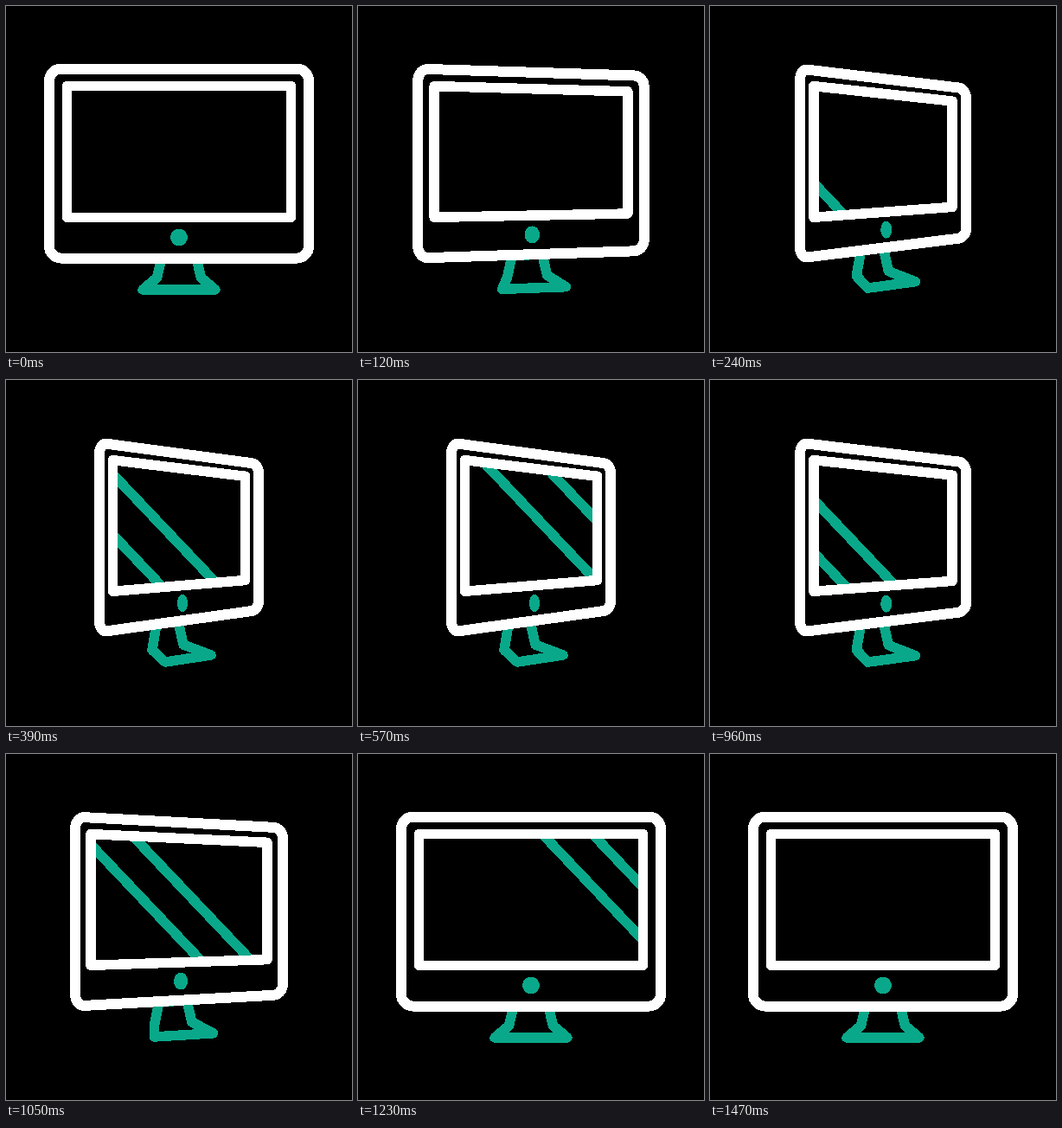
Write an HTML page that moves like this. It is 400 px wide and 400 px high and loops after 3.62 s.

```html
<!DOCTYPE html>
<html lang="en">
<head>
<meta charset="utf-8">
<title>Turning monitor</title>
<style>
  html, body { margin: 0; width: 100%; height: 100%; overflow: hidden; background: #000; }
  svg { display: block; width: 100%; height: 100%; }
  path { fill: none; stroke: #fff; stroke-width: 11.5; stroke-linejoin: round; shape-rendering: crispEdges; }
  #bezel { stroke-width: 12; }
  #stand, #stripes { stroke: #0aa88a; }
  #dot { fill: #0aa88a; shape-rendering: crispEdges; }
</style>
</head>
<body>
<svg viewBox="0 0 400 400">
  <clipPath id="glass"><path id="pane"/></clipPath>
  <path id="stand"/>
  <path id="bezel"/>
  <g clip-path="url(#glass)"><path id="stripes"/></g>
  <path id="screen"/>
  <ellipse id="dot"/>
</svg>
<script>
const LOOP = 3620, STEP = 30, TURN = 294, TURN_END = 1200;
const SWEEP_START = 150, SWEEP = 660;

const $ = id => document.getElementById(id);
const set = (id, attrs) => Object.entries(attrs).forEach(([k, v]) => $(id).setAttribute(k, v));
const mix = (a, b, p) => a + (b - a) * p;
const lerp = (a, b, p) => a.map((v, i) => mix(v, b[i], p));
const polygon = pts => `M${pts.join('L')}Z`;

function ease(u) {
  u = Math.min(1, Math.max(0, u));
  return u < 0.5 ? 2 * u * u : 1 - 2 * (1 - u) ** 2;
}

// A centred panel: turning narrows it by dx per side and shortens its far edge.
function panel(left, top, bottom, dx, drop, rise) {
  const l = left + dx, r = 400 - left - dx;
  return [[l, top], [r, top + drop], [r, bottom - rise], [l, bottom]];
}

function rounded(pts, inset) {
  const corners = pts.map((c, i) => {
    const a = lerp(c, pts[(i + 3) % 4], inset[(i + 1) % 2]);
    const b = lerp(c, pts[(i + 1) % 4], inset[i % 2]);
    return `${a}C${lerp(c, a, 0.45)} ${lerp(c, b, 0.45)} ${b}`;
  });
  return `M${corners.join('L')}Z`;
}

function stand(p) {
  const leg = [[-20, 291.5], [-25.5, 314], [-42, 328]];
  const front = [...leg, ...leg.map(([x, y]) => [-x, y]).reverse()];
  const turned = [[-26, 282], [-31, 312], [-16, 326], [37, 318], [5, 306], [-1, 279]];
  return front.map(([x, y], i) => lerp([200 + x, y], [200 + turned[i][0], turned[i][1]], p));
}

// Two parallel stripes cross the glass twice, the second time faster and closer together.
function stripes(t) {
  const n = Math.floor((t - SWEEP_START) / SWEEP);
  if (n < 0 || n > 1) return '';
  const u = t - SWEEP_START - n * SWEEP - 240;
  const lead = mix(181.5, 218, n) + mix(0.6, 0.74, n) * u - 0.0002 * u * u;
  const gap = mix(66.5, 58, n);
  return [lead, lead - gap].map(x => `M${x - 95},70L${x + 95},270`).join('');
}

function draw(t) {
  const p = ease(t / TURN) * ease((TURN_END - t) / TURN);
  const glass = polygon(panel(70.5, 92.6, 244.3, 52.9 * p, 18.7 * p, 12.8 * p));
  set('bezel', { d: rounded(panel(50, 72.6, 291.5, 57.8 * p, 24.6 * p, 25.6 * p), [0.045, 0.062]) });
  set('pane', { d: glass });
  set('screen', { d: glass });
  set('stand', { d: polygon(stand(p)) });
  set('stripes', { d: stripes(t) });
  set('dot', { cx: 200 + 4 * p, cy: 267.5 - 9.5 * p, rx: 10 - 3.8 * p, ry: 10 });
}

const start = performance.now();
function frame() {
  const t = (performance.now() - start) % LOOP;
  draw(Math.floor(t / STEP) * STEP);
  requestAnimationFrame(frame);
}
frame();
</script>
</body>
</html>
```
